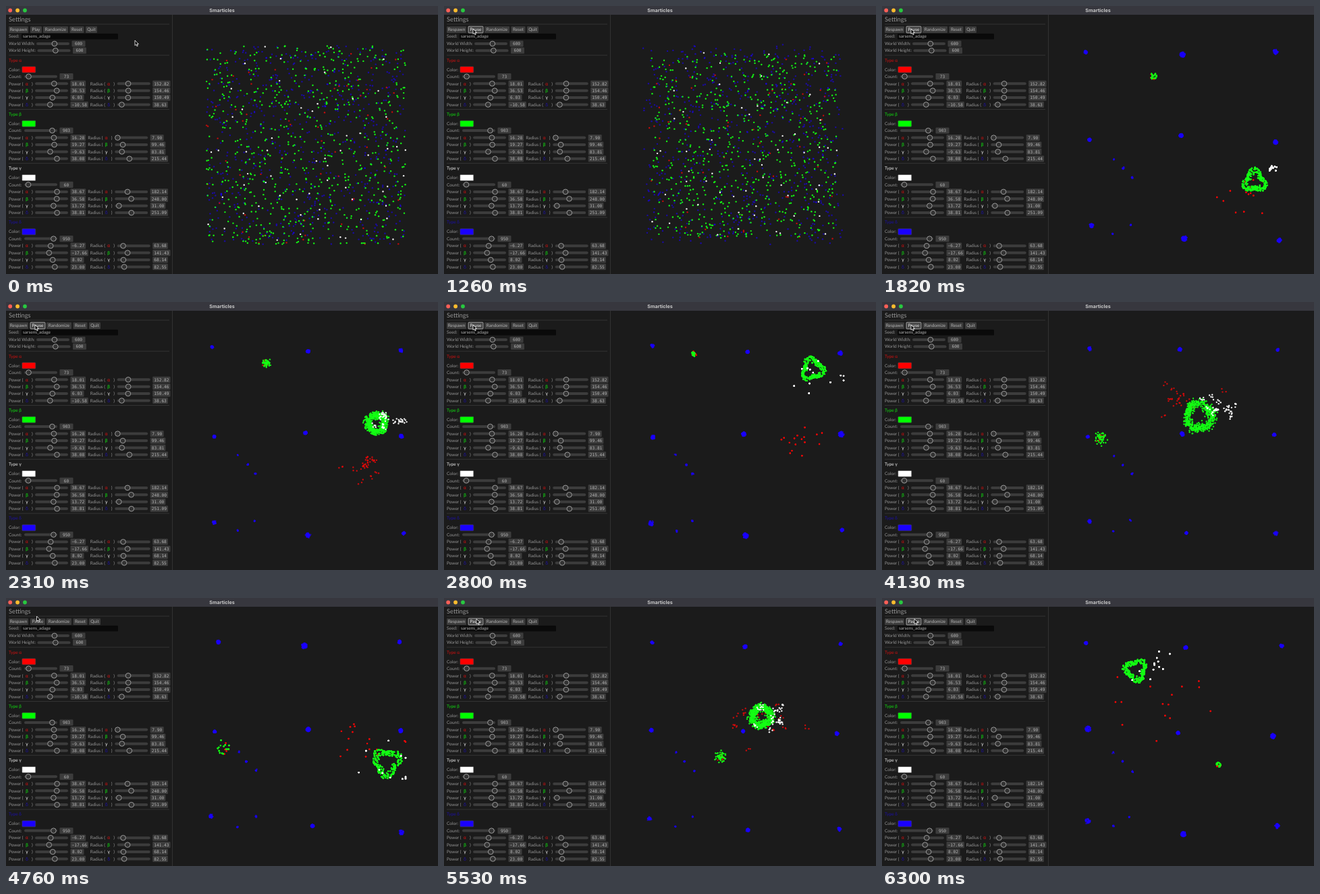
An HTML page with a canvas that plays this animation: 640 px wide and 398 px high, repeating every 6370 ms.

```html
<!DOCTYPE html>
<html lang="en">
<head>
<meta charset="utf-8">
<title>Smarticles</title>
<style>
  html, body { margin: 0; width: 100%; height: 100%; overflow: hidden; background: #1b1b1b; }
  svg, canvas { position: absolute; left: 0; top: 0; width: 640px; height: 398px; }
  text { font: 6.5px Lato, "Noto Sans", sans-serif; fill: #969696; text-rendering: geometricPrecision; white-space: pre; }
  .mono { font: 6.2px "DejaVu Sans Mono", monospace; fill: #b4b4b4; text-anchor: middle; }
  .label { fill: #b4b4b4; text-anchor: middle; }
  .greek { font-family: "DejaVu Sans", sans-serif; text-anchor: middle; }
  .heading { font-size: 9.3px; }
  .title { font: bold 7.2px Inter, sans-serif; fill: #c8c8c8; text-anchor: middle; }
  .hover rect { fill: #464646; stroke: #bbb; stroke-width: .8; }
  .hover text { fill: #eee; }
</style>
</head>
<body>
<canvas id="world" width="640" height="398"></canvas>
<svg id="ui" viewBox="0 0 640 398"></svg>
<script>
const LOOP = 6370, STEP = 70, START = 1050;
const ui = document.getElementById('ui');
const ctx = document.getElementById('world').getContext('2d');

// ---------- settings panel ----------
function add(tag, attrs, parent = ui, content) {
  const el = document.createElementNS('http://www.w3.org/2000/svg', tag);
  for (const k in attrs) el.setAttribute(k, attrs[k]);
  if (content) el.textContent = content;
  return parent.appendChild(el);
}
const box = (x, y, width, height, fill, rx = 0, parent = ui) =>
  add('rect', { x, y, width, height, fill, rx }, parent);
const text = (s, x, y, cls = '', fill, parent = ui) =>
  add('text', { x, y: y + 2.2, class: cls, style: fill ? `fill:${fill}` : '' }, parent, s);
const rule = y => box(4, y, 238, .8, '#3a3a3a');

function slider(x, y, value, min, max, digits = 0) {
  const label = value.toFixed(digits).replace('-', '−');
  const w = Math.max(20, label.length * 3.73 + 4);
  const knob = x + 3.5 + 42 * (value - min) / (max - min);
  box(x, y - 2, 49, 4, '#3c3c3c', 2);
  add('circle', { cx: knob, cy: y, r: 3.8, fill: '#333', stroke: '#a6a6a6', 'stroke-width': .9 });
  box(x + 52.5, y - 4.6, w, 9.2, '#3c3c3c', 1);
  text(label, x + 52.5 + w / 2, y, 'mono');
}

function button(s, x, w, parent) {
  const g = add('g', {}, parent);
  box(x, 30.2, w, 9.8, '#3c3c3c', 1, g);
  text(s, x + w / 2, 35, 'label', '', g);
  return g;
}

box(0, 0, 640, 13, '#37373e');
['#ff5f57', '#febc2e', '#28c840'].forEach((fill, i) =>
  add('circle', { cx: 6.2 + i * 10.9, cy: 6.5, r: 2.9, fill }));
text('Smarticles', 320, 6.8, 'title');
box(246, 13, .9, 385, '#363636');
text('Settings', 4, 21, 'heading');
rule(26.6);

button('Respawn', 4, 29, ui);
const paused = add('g', {}), playing = add('g', {});
const play = button('Play', 36, 17, paused);
const pause = button('Pause', 36, 22, playing);
[paused, playing].forEach((g, i) => {
  button('Randomize', 55 + 5 * i, 37, g);
  button('Reset', 94.5 + 5 * i, 21, g);
  button('Quit', 118 + 5 * i, 17, g);
});

text('Seed:', 4, 45);
box(23, 41, 143, 8.6, '#0a0a0a', 1);
text('sarsens_adage', 25, 45, '', '#b0b0b0');
text('World Width:', 4, 56);
slider(45, 56, 600, 100, 1000);
text('World Height:', 4, 66.2);
slider(46.5, 66.2, 600, 100, 1000);

const types = [
  { letter: 'α', ink: '#d01010', swatch: '#ff0000', count: 73, power: [18.01, 36.53, 6.03, -10.58], radius: [152.82, 154.46, 150.49, 38.63] },
  { letter: 'β', ink: '#10e010', swatch: '#00ff00', count: 903, power: [16.28, 19.27, -9.63, 38.08], radius: [7.9, 99.46, 83.81, 215.44] },
  { letter: 'γ', ink: '#f0f0f0', swatch: '#ffffff', count: 60, power: [38.67, 36.58, 13.72, 38.81], radius: [182.14, 248, 31, 251.09] },
  { letter: 'δ', ink: '#1c10a4', swatch: '#1a00ff', count: 950, power: [-6.27, -17.66, 8.02, 23], radius: [63.68, 141.43, 68.14, 82.55] }
];

function field(name, x, y, other, gap) {
  text(name + ' (', x, y);
  text(other.letter, x + gap, y, 'greek', other.ink);
  text(')', x + gap + 7, y);
}

types.forEach((type, i) => {
  const y = 80.3 + i * 80.3;
  const right = type.power.some(p => p <= -10) ? 124.7 : 121.2;
  rule(y - 7.6);
  text('Type ' + type.letter, 4, y, '', type.ink);
  text('Color:', 4, y + 14);
  add('rect', { x: 23.8, y: y + 9.6, width: 20, height: 9, rx: 1, fill: type.swatch, stroke: '#444', 'stroke-width': .6 });
  text('Count:', 4, y + 24.4);
  slider(27, y + 24.4, type.count, 0, 1000);
  types.forEach((other, j) => {
    const row = y + 35 + j * 10.4;
    field('Power', 4, row, other, 27);
    slider(43, row, type.power[j], -100, 100, 2);
    field('Radius', right, row, other, 27.5);
    slider(right + 40, row, type.radius[j], 0, 500, 2);
  });
});

const cursor = add('path', {
  d: 'M0 0V7.6L1.8 6L3 8.8L4.3 8.2L3.1 5.5H5.4Z',
  fill: '#000', stroke: '#fff', 'stroke-width': .8
});

// ---------- particles ----------
let seed = 20;
function rand() {
  seed = (seed + 0x6D2B79F5) | 0;
  let t = Math.imul(seed ^ seed >>> 15, 1 | seed);
  t ^= t + Math.imul(t ^ t >>> 7, 61 | t);
  return ((t ^ t >>> 14) >>> 0) / 4294967296;
}
const spread = r => r * (rand() + rand() - 1);
const clamp = (v, lo, hi) => Math.max(lo, Math.min(hi, v));
const around = ([x, y, r]) =>
  [clamp(x + spread(r) * 1.5, 300, 592), clamp(y + spread(r), 60, 352)];

// x, y, reach of the green ring, its stray group, and the red and white scatter
const poses = [
  { t: 1820, ring: [552, 260, 17], stray: [402, 104, 5], red: [540, 278, 32], white: [580, 240, 6] },
  { t: 2800, ring: [546, 100, 17], stray: [371, 77, 4], red: [530, 205, 26], white: [552, 110, 44] },
  { t: 3570, ring: [392, 107, 30], stray: [328, 184, 8], red: [365, 95, 60], white: [445, 80, 22] },
  { t: 4760, ring: [564, 244, 21], stray: [320, 222, 11], red: [535, 205, 45], white: [565, 245, 40] },
  { t: 6300, ring: [376, 107, 17], stray: [499, 247, 4], red: [440, 150, 70], white: [390, 100, 30] }
];
const times = [0, START, 1260, ...poses.map(p => p.t)];

// blue settles in a loose grid of clumps, with a few thin ones between
const clumps = [];
for (let row = 0; row < 3; row++)
  for (let col = 0; col < 3; col++)
    clumps.push({ x: 307 + 139 * col, y: 70 + 128 * row + 18 * (row > 1 && col > 0), size: 2.6, sway: 9 });
for (let i = 0; i < 5; i++)
  clumps.push({ x: 310 + 80 * rand(), y: 200 + 145 * rand(), size: 1.2, sway: 3 });
for (const c of clumps)
  c.spots = poses.map(() => [c.x + spread(c.sway), c.y + spread(c.sway), c.size * (.7 + rand())]);

function nearest([x, y]) {
  const d = c => Math.hypot(c.x - x, c.y - y) * (c.size < 2 ? 2.5 : 1);
  return clumps.reduce((best, c) => d(c) < d(best) ? c : best);
}

function disc([x, y, r]) {
  const a = 2 * Math.PI * rand(), d = r * Math.sqrt(rand());
  return [x + d * Math.cos(a), y + d * Math.sin(a)];
}

function onRing([x, y, r], i, turn) {
  const a = i * 2.4 + turn;
  const d = r * (.45 + .55 * Math.sqrt(rand())) * (1 + .2 * Math.sin(3 * a + turn));
  return [x + d * Math.cos(a), y + d * Math.sin(a)];
}

// routes are shared, since particles of one kind pile up on each other
const routes = (n, place) =>
  Array.from({ length: n }, (_, i) => poses.map((p, k) => place(p, i, k)));

function swarm(color, alpha, n, squeeze, shared) {
  const dots = Array.from({ length: n }, (_, i) => {
    const home = [297 + 295 * rand(), 59 + 295 * rand()];
    const start = [444.5 + (home[0] - 444.5) * squeeze + spread(4),
                   206.5 + (home[1] - 206.5) * squeeze + spread(4)];
    const route = shared ? shared[i % shared.length] : nearest(home).spots.map(disc);
    return { path: [home, home, start, ...route], drift: shared ? 6 * rand() : 0, phase: i };
  });
  return { color, alpha, dots };
}
const swarms = [
  swarm('#1a00ff', .6, 650, 1),
  swarm('#f00808', .8, 60, .94, routes(20, (p, i) => i % 6 ? around(p.red) : disc(p.stray))),
  swarm('#14ff14', .95, 640, .92, routes(190, (p, i, k) => i % 14 ? onRing(p.ring, i, k) : disc(p.stray))),
  swarm('#ffffff', .95, 60, .94, routes(12, p => around(p.white)))
];

// ---------- playback ----------
const mix = (a, b, p) => a + (b - a) * p;
const smooth = p => p * p * (3 - 2 * p);

function segment(keys, t) {
  let k = 0;
  while (k < keys.length - 2 && t >= keys[k + 1]) k++;
  return [k, clamp((t - keys[k]) / (keys[k + 1] - keys[k]), 0, 1)];
}

function drawSwarms(t) {
  const [k, p] = segment(times, t), s = smooth(p);
  ctx.globalAlpha = 1;
  ctx.fillStyle = '#1b1b1b';
  ctx.fillRect(0, 0, 640, 398);
  for (const { color, alpha, dots } of swarms) {
    ctx.fillStyle = color;
    ctx.globalAlpha = alpha;
    for (const { path, drift, phase } of dots) {
      const a = path[k], b = path[k + 1];
      const sway = k > 2 ? drift * Math.sin(Math.PI * p) : 0;
      ctx.beginPath();
      ctx.arc(mix(a[0], b[0], s) + sway * Math.cos(phase + p * 6),
              mix(a[1], b[1], s) + sway * Math.sin(phase + p * 6), 1.2, 0, 7);
      ctx.fill();
    }
  }
}

const hand = [
  { t: 280, x: 191, y: 51 }, { t: 910, x: 43, y: 34 }, { t: 4270, x: 43, y: 34 },
  { t: 4690, x: 45.5, y: 27 }, { t: 4970, x: 45.5, y: 27 }, { t: 5460, x: 48, y: 31 }
];

function drawControls(t) {
  const [k, p] = segment(hand.map(h => h.t), t);
  const x = mix(hand[k].x, hand[k + 1].x, smooth(p));
  const y = mix(hand[k].y, hand[k + 1].y, smooth(p));
  const over = x > 36 && x < 58 && y > 30 && y < 40;
  cursor.setAttribute('transform', `translate(${x} ${y})`);
  paused.style.display = t < START ? '' : 'none';
  playing.style.display = t < START ? 'none' : '';
  for (const b of [play, pause]) b.setAttribute('class', over ? 'hover' : '');
}

const begin = performance.now();
function frame() {
  const t = Math.floor((performance.now() - begin) % LOOP / STEP) * STEP;
  drawSwarms(t);
  drawControls(t);
  requestAnimationFrame(frame);
}
frame();
</script>
</body>
</html>
```
